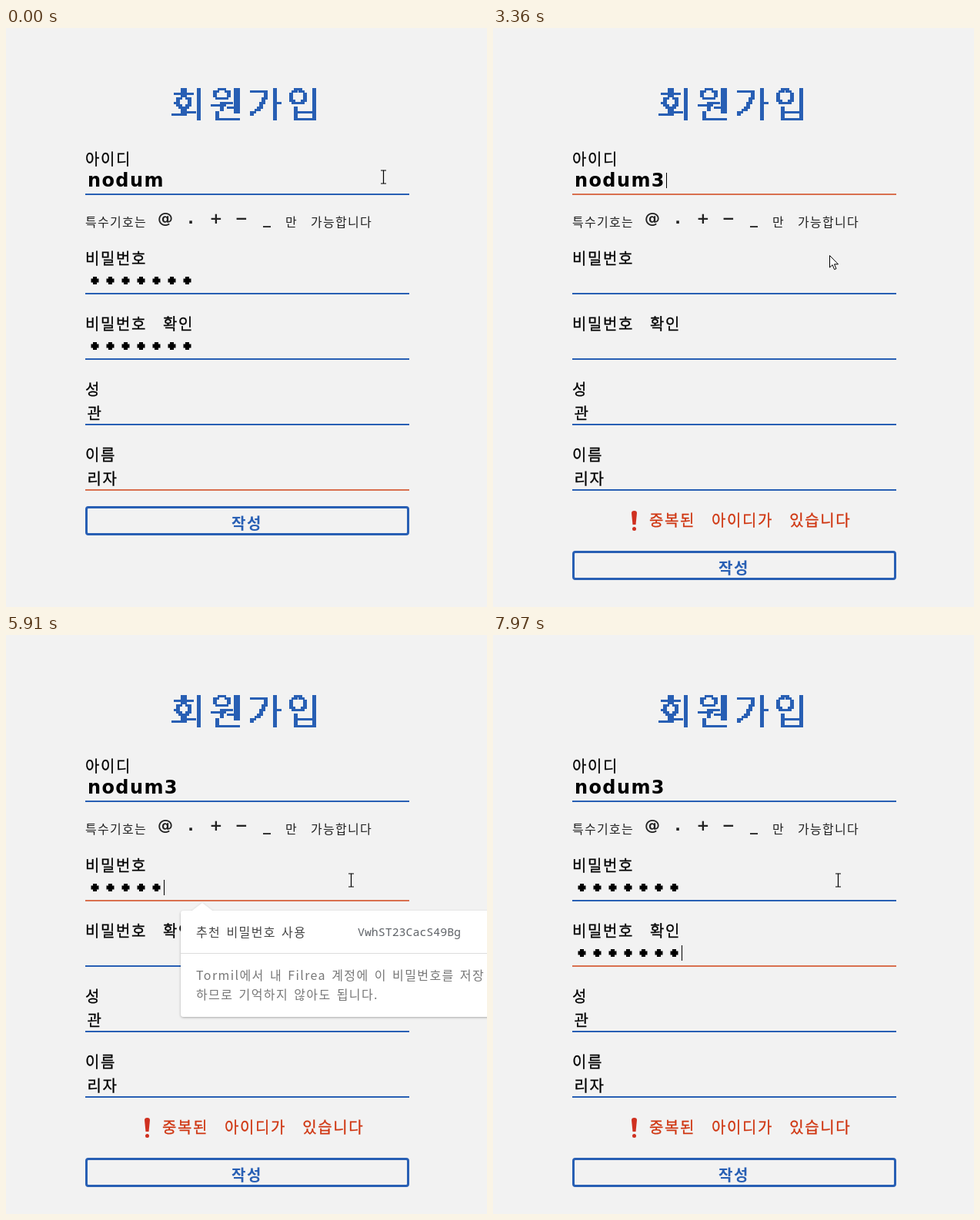
Recreate the animation shown at these times as an HTML page. Size 625 by 752 pixels, loop 8 s.

```html
<!DOCTYPE html>
<html lang="ko">
<head>
<meta charset="utf-8">
<title>회원가입</title>
<style>
  html, body { margin: 0; width: 100%; height: 100%; overflow: hidden; background: #f2f2f2; }
  svg { display: block; width: 625px; height: 752px; }
  text { font-family: "Noto Sans CJK KR", "Noto Sans CJK JP", "Noto Sans CJK", sans-serif; white-space: pre; }
  .title { font-size: 48px; letter-spacing: 6.2px; fill: #285fb4; }
  .label, .error, .send { font-size: 20px; letter-spacing: 1.6px; word-spacing: 13.9px; font-weight: 500; }
  .label { stroke: #000; stroke-width: .3px; }
  .error { fill: #cf3510; stroke: #cf3510; stroke-width: .3px; }
  .send { fill: #285fb4; font-weight: 700; }
  .hint { font-size: 16px; letter-spacing: 1.3px; word-spacing: 11.1px; fill: #222; }
  .sign { font: 700 20px "DejaVu Sans", sans-serif; text-anchor: middle; fill: #222; }
  .user { font: 700 24px "DejaVu Sans", sans-serif; letter-spacing: 1.4px; }
  .tip, .note { font-size: 16px; letter-spacing: 1.4px; word-spacing: 1.3px; fill: #444; }
  .note { fill: #777; }
  .code { font: 14.9px "Noto Sans Mono", "DejaVu Sans Mono", monospace; fill: #5f6368; }
</style>
</head>
<body>
<svg id="stage" viewBox="0 0 625 752">
  <defs>
    <!-- mosaic for the heading: upright strokes come out heavier -->
    <filter id="blocks" filterUnits="userSpaceOnUse" x="210" y="72" width="210" height="57" color-interpolation-filters="sRGB">
      <feFlood x="211" y="73" width="1" height="1" flood-color="#000" result="dot"/>
      <feComposite in="dot" in2="dot" operator="over" x="210" y="72" width="3" height="3" result="cell"/>
      <feTile in="cell" result="grid"/>
      <feComposite in="SourceGraphic" in2="grid" operator="in"/>
      <feComponentTransfer><feFuncA type="discrete" tableValues="0 1"/></feComponentTransfer>
      <feMorphology operator="dilate" radius="2 1"/>
    </filter>
    <filter id="shade" x="-5%" y="-5%" width="110%" height="115%">
      <feDropShadow dx="0" dy="1" stdDeviation="1.6" flood-color="#000" flood-opacity=".3"/>
    </filter>
  </defs>
</svg>
<script>
const LOOP = 8000, BLINK = 505, RELOAD = 1340;
const BLUE = '#285fb4', ORANGE = '#d9704f', BG = '#f2f2f2';
const stage = document.getElementById('stage');

function add(tag, attrs, parent = stage) {
  const el = document.createElementNS('http://www.w3.org/2000/svg', tag);
  for (const k in attrs) el.setAttribute(k, attrs[k]);
  parent.appendChild(el);
  return el;
}
function word(cls, x, y, str, parent) {
  const el = add('text', { class: cls, x, y }, parent);
  el.textContent = str;
  return el;
}
const box = (x, y, width, height, fill, parent) => add('rect', { x, y, width, height, fill }, parent);
const show = (el, on) => el.setAttribute('visibility', on ? 'visible' : 'hidden');
const clamp = v => Math.min(1, Math.max(0, v));

// form: the hint pushes every field after the first one down
const lineY = i => i ? 259 + 85 * i : 215;
const columnX = n => 106 + 20 * n - (n ? 1 : 0);

word('title', 214, 116.5, '회원가입').setAttribute('filter', 'url(#blocks)');
const lines = ['아이디', '비밀번호', '비밀번호 확인', '성', '이름'].map((name, i) => {
  word('label', 103, lineY(i) - 37.5, name);
  return box(103, lineY(i), 421, 2, BLUE);
});
const user = word('user', 106, 205.5, '');
word('label', 105.5, lineY(3) - 6, '관');
word('label', 105.5, lineY(4) - 6, '리자');

word('hint', 103, 257.5, '특수기호는');
[...'@.+−_'].forEach((s, i) => word('sign', 207 + 33 * i, 254, s));
word('hint', 363, 257.5, '만 가능합니다');

const rows = [1, 2].map(f => Array.from({ length: 7 }, (_, i) => add('path', {
  d: 'M-2.5-5h5v2.500h2.500v5h-2.500v2.500h-5v-2.500h-2.500v-5h2.500z',
  transform: `translate(${115.5 + 20 * i} ${lineY(f) - 16})`
})));

const error = add('g', {});
add('path', { d: 'M180 630q0-3 3.500-3t3.500 3l-1.500 15h-4z', fill: '#cf3020' }, error);
add('circle', { cx: 183.5, cy: 650.5, r: 2.5, fill: '#cf3020' }, error);
word('error', 203, 646.5, '중복된 아이디가 있습니다', error);

const button = add('g', {});
add('rect', { x: 104.5, y: 622.5, width: 418, height: 35, rx: 2.5, fill: 'none', stroke: BLUE, 'stroke-width': 3 }, button);
const pressed = add('g', {}, button);
box(106, 656, 415, 1, BG, pressed);
box(105, 657, 417, 2, ORANGE, pressed);
word('send', 293, 651, '작성', button);

const caret = box(0, 0, 1, 20, '#000');

const popup = add('g', {});
add('path', { d: 'M231 358H242L255 348L268 358H635a4 4 0 0 1 4 4V492a4 4 0 0 1-4 4H231a4 4 0 0 1-4-4V362a4 4 0 0 1 4-4z', fill: '#fff', filter: 'url(#shade)' }, popup);
box(227, 413, 412, 1, '#dcdcdc', popup);
word('tip', 247, 392, '추천 비밀번호 사용', popup);
word('code', 457, 391, 'VwhST23CacS49Bg', popup);
word('note', 247, 448, 'Tormil에서 내 Filrea 계정에 이 비밀번호를 저장', popup);
word('note', 247, 473, '하므로 기억하지 않아도 됩니다.', popup);

// pointers, hot spot at 0,0
const pointers = {
  beam: add('path', { d: 'M-3.5-8.5h3l.5.5l.5-.5h3M0-8V8M-3.5 8.5h3l.5-.5l.5.5h3', fill: 'none', stroke: '#000', 'stroke-width': 1.2 }),
  arrow: add('path', { d: 'M.5.5V16l3.6-3.4l2.5 6l2.4-1l-2.5-5.8h5z', fill: '#fff', stroke: '#000' }),
  hand: add('path', { d: 'M-1.5 15V2q0-2 2-2t2 2v6q3-1.5 3.5 1q3-1 3.5 1.3q3-.6 3 2.2v5q0 3-2 6h-8q-2-4-7-8.5q-2-3 .5-3.5z', fill: '#fff', stroke: '#112', 'stroke-width': 1.2 })
};

// pointer stops: time, x, y
const stops = [
  [0, 490, 193], [560, 490, 195], [860, 575, 460], [1150, 458, 629], [1640, 458, 629],
  [1850, 499, 390], [2080, 421, 187], [3000, 421, 189], [3360, 437, 295], [3700, 448, 318]
];

// caret moves: time, field (-1 is the button), column
const typing = (from, gap, field) => Array.from({ length: 7 }, (_, i) => [from + gap * i, field, i + 1]);
const moves = [
  [-680, 4, 2], [1140, -1, 0], [RELOAD, 0, 0], [2620, 0, 5], [2890, 0, 6],
  [3630, 1, 0], ...typing(5030, 215, 1),
  [6450, 2, 0], ...typing(7180, 131, 2)
];

function pointerAt(t) {
  const i = stops.findIndex(s => s[0] > t);
  if (i < 0) return stops[stops.length - 1].slice(1);
  const [t0, x0, y0] = stops[i - 1], [t1, x1, y1] = stops[i];
  const p = (t - t0) / (t1 - t0);
  return [x0 + (x1 - x0) * p, y0 + (y1 - y0) * p].map(Math.round);
}

function draw(t) {
  const failed = t >= RELOAD;
  const past = moves.filter(m => m[0] <= t);
  const [since, field, column] = past[past.length - 1];

  user.textContent = t < 2890 ? 'nodum' : 'nodum3';
  lines.forEach((l, i) => l.setAttribute('fill', i === field ? ORANGE : BLUE));
  rows.forEach((row, r) => {
    const typed = past.filter(m => m[1] === r + 1 && m[2]).length;
    row.forEach((d, i) => show(d, !failed || i < typed));
  });

  show(caret, field >= 0 && Math.floor((t - since) / BLINK) % 2 === 0);
  caret.setAttribute('x', columnX(column));
  caret.setAttribute('y', lineY(Math.max(field, 0)) - (field ? 26 : 27));

  show(error, failed);
  show(pressed, field < 0);
  button.setAttribute('transform', `translate(0 ${failed ? 58 : 0})`);

  const o = clamp((t - 3640) / 130) * clamp((6320 - t) / 160) ** 2;
  show(popup, o > 0);
  popup.setAttribute('opacity', o);
  popup.setAttribute('transform', `translate(433 427) scale(${.95 + .05 * o}) translate(-433 -427)`);

  const [x, y] = pointerAt(t);
  const inside = x > 103 && x < 524;
  const kind = inside && lines.some((_, i) => y > lineY(i) - 35 && y < lineY(i) + 2) ? 'beam'
    : inside && !failed && y > 621 && y < 660 ? 'hand' : 'arrow';
  for (const k in pointers) show(pointers[k], k === kind);
  const half = kind === 'beam' ? .5 : 0;
  pointers[kind].setAttribute('transform', `translate(${x + half} ${y + half})`);
}

const start = performance.now();
function tick() {
  draw((performance.now() - start) % LOOP);
  requestAnimationFrame(tick);
}
tick();
</script>
</body>
</html>
```
